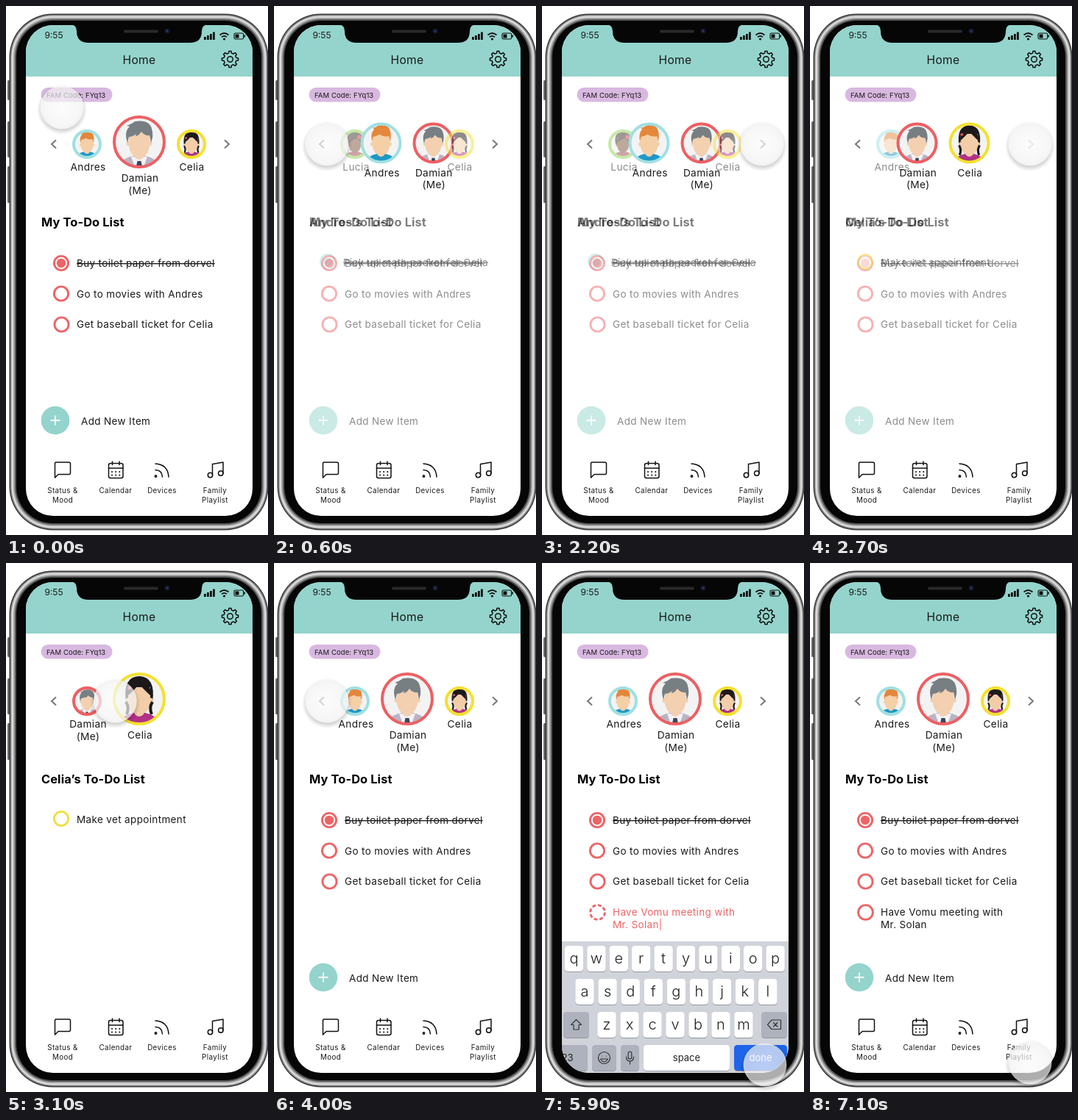
An HTML page for the animation above (7.2 s loop, 356 by 720 pixels).

```html
<!DOCTYPE html>
<html lang="en">
<head>
<meta charset="utf-8">
<title>Family to-do app</title>
<style>
html, body { margin: 0; width: 100%; height: 100%; overflow: hidden; background: #fff; }
svg { display: block; width: 100vw; height: 100vh; }
text { font-family: Inter, "Open Sans", sans-serif; fill: #1a1a1a; }
.mid { text-anchor: middle; }
.item { font-size: 13.5px; letter-spacing: .35px; }
.done { text-decoration: line-through; text-decoration-thickness: 1px; }
.name { font-size: 13.7px; letter-spacing: .35px; text-anchor: middle; }
.title { font-size: 16.4px; font-weight: 700; letter-spacing: .1px; fill: #000; }
.nav { font-size: 9.8px; letter-spacing: .4px; text-anchor: middle; }
.icon { fill: none; stroke: #111; stroke-width: 1.5; stroke-linecap: round; stroke-linejoin: round; }
.thin { stroke: #333; stroke-width: 1.2; }
.arrow { fill: none; stroke: #777; stroke-width: 2; }
.ring { fill: #fff; stroke-width: 2.9; }
</style>
</head>
<body>
<svg viewBox="0 0 356 720" xmlns="http://www.w3.org/2000/svg">
<defs>
  <clipPath id="screen"><rect x="27" y="26" width="308" height="668" rx="37"/></clipPath>
  <clipPath id="disc"><circle r="34"/></clipPath>
  <radialGradient id="tip">
    <stop offset="0" stop-color="#fbfbfb" stop-opacity=".7"/>
    <stop offset=".85" stop-color="#f3f3f3" stop-opacity=".7"/>
    <stop offset="1" stop-color="#ededed" stop-opacity=".75"/>
  </radialGradient>
  <radialGradient id="shade">
    <stop offset=".8" stop-color="#000" stop-opacity=".17"/>
    <stop offset="1" stop-color="#000" stop-opacity="0"/>
  </radialGradient>
  <mask id="outside"><rect x="-40" y="-40" width="80" height="80" fill="#fff"/><circle r="29" fill="#000"/></mask>
</defs>

<rect width="356" height="720" fill="#fff"/>
<g fill="#666">
  <rect x="2" y="101" width="4" height="27" rx="1.5"/>
  <rect x="2" y="157" width="4" height="49" rx="1.5"/>
  <rect x="2" y="218" width="4" height="50" rx="1.5"/>
  <rect x="354" y="170" width="4" height="76" rx="1.5"/>
</g>
<g id="body"></g>
<rect x="27" y="26" width="308" height="668" rx="37" fill="#fff"/>

<g clip-path="url(#screen)">
  <rect x="27" y="26" width="308" height="70" fill="#94d4cc"/>
  <text x="65" y="44" class="mid" font-size="12">9:55</text>
  <g fill="#111">
    <rect x="269" y="42" width="2.8" height="4"/><rect x="273" y="40" width="2.8" height="6"/>
    <rect x="277" y="38" width="2.8" height="8"/><rect x="281" y="35.5" width="2.8" height="10.5"/>
    <circle cx="296.5" cy="45" r="1.6"/>
    <rect x="311.5" y="38.5" width="5" height="5"/><rect x="323.4" y="39.3" width="1.5" height="3.4"/>
  </g>
  <path d="M290.5 39.5q6-5 12 0M293 42.3q3.5-2.8 7 0" fill="none" stroke="#111" stroke-width="1.8"/>
  <rect x="310" y="37" width="12.6" height="8" rx="1.8" fill="none" stroke="#111" stroke-width="1.1"/>
  <text x="181" y="79" class="mid" font-size="15.6" letter-spacing=".3">Home</text>
  <g class="icon" transform="translate(304.5 72.5)"><path id="gear"/><circle r="3.8"/></g>

  <rect x="47.5" y="111" width="97" height="19.5" rx="9.7" fill="#d8b8e0"/>
  <text x="55" y="124.5" font-size="9.5" letter-spacing=".1">FAM Code: FYq13</text>
  <path class="arrow" d="M68 182.5l-6 5.5 6 5.5"/>
  <path class="arrow" id="next" d="M297 182.5l6 5.5-6 5.5"/>
  <g id="people"></g>

  <g id="lists">
    <g></g>
    <g>
      <text class="title" x="48" y="300">Andres’s To-Do List</text>
      <circle class="ring" cx="73" cy="348" r="9.6" stroke="#a0e0e2"/><circle cx="73" cy="348" r="6.3" fill="#a0e0e2"/>
      <text class="item done" x="94" y="353.5">Pick up math packet for Celia</text>
    </g>
    <g>
      <text class="title" x="48" y="300">My To-Do List</text>
      <g stroke="#ed6467">
        <circle class="ring" cx="75" cy="350" r="9.6"/><circle class="ring" cx="75" cy="391.5" r="9.6"/>
        <circle class="ring" cx="75.5" cy="433.5" r="9.6"/>
      </g>
      <circle cx="75" cy="350" r="6.2" fill="#ed6467"/>
      <text class="item done" x="96" y="355">Buy toilet paper from dorvel</text>
      <text class="item" x="96" y="396.5">Go to movies with Andres</text>
      <text class="item" x="96" y="438">Get baseball ticket for Celia</text>
      <g id="fresh">
        <circle class="ring" cx="75.5" cy="475.5" r="9.9" stroke="#ed6467"/>
        <text class="item" x="96" y="480"></text>
        <text class="item" x="96" y="496.5"></text>
      </g>
      <circle cx="67" cy="564" r="19.3" fill="#94d4cc"/>
      <path d="M60.5 564h13M67 557.5v13" stroke="#fff" stroke-width="1.8"/>
      <text class="item" x="102" y="570">Add New Item</text>
    </g>
    <g>
      <text class="title" x="48" y="300">Celia’s To-Do List</text>
      <circle class="ring" cx="75" cy="348" r="9.6" stroke="#f0df45"/>
      <text class="item" x="96" y="353.5">Make vet appointment</text>
    </g>
  </g>

  <g class="icon">
    <path d="M68 621h17.5q2 0 2 2v12.5q0 2-2 2H71l-4.5 4.5V623q0-2 1.5-2z"/>
    <rect x="139.5" y="622.5" width="19.5" height="20" rx="2.5"/>
    <path d="M139.5 629h19.5M144.5 620v4.5M154 620v4.5"/>
    <path d="M144 634h.1m5 0h.1m5 0h.1M144 638.5h.1m5 0h.1m5 0h.1" stroke-width="2"/>
    <path d="M203 631.5q9 0 9.5 9.5M203 623q17 1 18 18"/><circle cx="203.5" cy="640" r="1.2"/>
    <path d="M280.5 638.5V623.5l14.5-2.5v15"/><circle cx="277.5" cy="638.5" r="3.2"/><circle cx="291.8" cy="636" r="3.2"/>
  </g>
  <text class="nav" x="77" y="663">Status &amp;</text><text class="nav" x="77" y="676">Mood</text>
  <text class="nav" x="149" y="663">Calendar</text><text class="nav" x="212" y="663">Devices</text>
  <text class="nav" x="284" y="663">Family</text><text class="nav" x="284" y="676">Playlist</text>

  <g id="board"></g>
</g>

<path d="M88 25q8 1 8 9q0 16 16 16H250q16 0 16-16q0-8 8-9z" fill="#060606"/>
<rect x="160" y="32.5" width="47" height="4" rx="2" fill="#292929"/>
<circle cx="219" cy="34" r="3.5" fill="#14182c"/><circle cx="219" cy="34" r="1.5" fill="#2b3768"/>

<g id="finger">
  <circle cy="3" r="34" fill="url(#shade)" mask="url(#outside)"/>
  <circle r="29" fill="url(#tip)" stroke="#fff" stroke-opacity=".5"/>
</g>
</svg>
<script>
const LOOP = 7200, STEP = 100;
const $ = id => document.getElementById(id);
const set = (el, attrs) => { for (const k in attrs) el.setAttribute(k, attrs[k]); };
const clamp = (v, lo = 0, hi = 1) => Math.max(lo, Math.min(hi, v));

// Eased value of a [time, value] track.
function track(keys, t) {
  const i = keys.findIndex(k => k[0] > t);
  if (i < 0) return keys[keys.length - 1][1];
  if (i === 0) return keys[0][1];
  const [t0, a] = keys[i - 1], [t1, b] = keys[i];
  const u = (t - t0) / (t1 - t0);
  return a + (b - a) * u * u * (3 - 2 * u);
}

const ACTIVE = [[0, 2], [400, 2], [800, 1], [2000, 1], [2400, 2], [2500, 2], [2900, 3], [3400, 3], [3800, 2]];
const FINGER_X = [[0, 76], [300, 72], [1200, 72], [1600, 299], [2880, 299], [3240, 72], [4150, 72], [4500, 70],
  [5450, 70], [5750, 303], [6300, 303], [6450, 299]];
const FINGER_Y = [[0, 138], [300, 188], [4150, 188], [4500, 563], [5450, 563], [5750, 683], [6300, 683], [6450, 680]];
const BOARD = [[4900, 185], [5200, 0], [6000, 0], [6300, 185]];
const NOTE = ["Have Vomu meeting with", "Mr. Solan"];

// Phone body: nested bands, [inset, colour], from the steel rim to the black bezel.
$("body").innerHTML = [[0, "#3a3a3a"], [1.5, "#8c8c8c"], [3, "#dcdcdc"], [5.5, "#a2a2a2"], [7.5, "#555"], [9.5, "#060606"]]
  .map(([d, fill]) => `<rect x="${4.5 + d}" y="${10.5 + d}" width="${352 - 2 * d}" height="${703 - 2 * d}" rx="${59 - d}" fill="${fill}"/>`)
  .join("");

const head = (skin, w) => `<path d="M-6 10h12v11q-6 6-12 0z" fill="${skin}"/>
  <circle cx="${-w}" cy="2" r="3.5" fill="${skin}"/><circle cx="${w}" cy="2" r="3.5" fill="${skin}"/>
  <path d="M${-w}-16H${w}V6Q${w - 2} 20 0 21Q${2 - w} 20 ${-w} 6z" fill="${skin}"/>`;
const shirt = color => `<path d="M-28 36Q-26 23-8 19H8Q26 23 28 36z" fill="${color}"/>`;

const people = [
  { name: "Lucia", ring: "#8fd254", art:
    `<path d="M-18 0Q-24-29 0-30Q24-29 18 0z" fill="#40352f"/>` + shirt("#a8435c") + head("#80563e", 14) +
    `<path d="M-15-2Q-15-20 2-20Q15-20 15-2Q10-12 3-14Q-6-10-15-2z" fill="#40352f"/>
     <circle cx="11" cy="-17" r="5" fill="#d5404a"/>` },
  { name: "Andres", ring: "#a0e0e2", art:
    shirt("#1f98c6") + head("#f5cfa6", 15) +
    `<path d="M-16-2Q-19-17-12-24L-15-27Q-8-27-5-31Q9-33 14-26Q19-17 16-2L14-12Q4-10-3-15Q-7-12-14-11z" fill="#e3873b"/>` },
  { name: "Damian", me: true, ring: "#ed5f63", art:
    shirt("#b9b3c2") + `<path d="M-11 20L-6 34 0 27 6 34 11 20z" fill="#f4f2f6"/>
     <path d="M-2.5 26h5l2 10h-9z" fill="#3b4560"/>` + head("#f2d0b0", 14) +
    `<path d="M-16 1Q-21-14-13-21L-17-22Q-9-25-6-28Q14-31 17-18Q20-8 16 1L14-9Q7-8 3-14Q-1-8-5-8L-4-11Q-9-7-14-7z" fill="#777f83"/>` },
  { name: "Celia", ring: "#f4e02f", art:
    `<path d="M-18 4Q-23-30 0-31Q23-30 18 4z" fill="#1d191b"/>` + shirt("#b23186") + head("#f3cda7", 15) +
    `<path d="M-16-4Q-16-25 0-26Q16-25 16-4Q9-10 0-20Q-9-10-16-4z" fill="#1d191b"/>
     <path d="M-18 4q5 8 1 17M18 4q-5 8-1 17" fill="none" stroke="#1d191b" stroke-width="4"/>
     <circle cx="-13" cy="-15" r="2.5" fill="#e0525c"/>` }
];

$("people").innerHTML = people.map(p => `<g><g clip-path="url(#disc)"><circle r="36" fill="#f3f3f3"/>${p.art}</g>
  <circle fill="none" stroke="${p.ring}" stroke-width="4"/>
  <text class="name"><tspan x="0">${p.name}</tspan>${p.me ? '<tspan x="0" dy="16.5">(Me)</tspan>' : ""}</text></g>`).join("");

// Gear outline: eight teeth.
$("gear").setAttribute("d", "M" + Array.from({ length: 32 }, (_, i) => {
  const a = (Math.floor(i / 4) + [-.29, -.17, .17, .29][i % 4]) * Math.PI / 4;
  const r = i % 4 === 0 || i % 4 === 3 ? 8.6 : 11.2;
  return `${(r * Math.sin(a)).toFixed(2)} ${(-r * Math.cos(a)).toFixed(2)}`;
}).join("L") + "Z");

function key(x, y, w, label = "", size = 20, fill = "#fff", ink = "#222") {
  return `<rect x="${x}" y="${y + 1}" width="${w}" height="35" rx="4.5" fill="#94979e"/>
    <rect x="${x}" y="${y}" width="${w}" height="35" rx="4.5" fill="${fill}"/>
    <text class="mid" x="${x + w / 2}" y="${y + 17.5 + size * .34}" font-size="${size}"
      font-weight="${size > 15 ? 300 : 400}" style="fill:${ink}">${label}</text>`;
}
const row = (letters, x, gap, y) => [...letters].map((c, i) => key(x + gap * i - 12.7, y, 25.4, c)).join("");
const GREY = "#adb2bc";
$("board").innerHTML = `<rect x="27" y="515" width="308" height="185" fill="#d0d3da"/>` +
  row("qwertyuiop", 43.5, 30.4, 521) + row("asdfghjkl", 58, 31.1, 566) + row("zxcvbnm", 88, 31, 611) +
  key(29, 611, 35, "", 13, GREY) + key(298, 611, 35, "", 13, GREY) +
  key(2, 656, 60, "123", 13, GREY) + key(68, 656, 33, "", 13, GREY) + key(107, 656, 25, "", 13, GREY) +
  key(138, 656, 117, "space", 13) + key(261, 656, 72, "done", 13, "#1f64ea", "#fff") +
  `<g class="icon thin"><path d="M46.500 621.500l7 7h-3.500v6.500h-7v-6.500h-3.500z"/>
   <path d="M312 622h12.500v12.500H312l-5.500-6.200zM314.500 625.500l5.500 5.500m0-5.500l-5.500 5.500"/>
   <circle cx="84.500" cy="673.500" r="8"/><path d="M79.500 675q5 8 10 0zM81.500 671v.1M87.500 671v.1"/>
   <rect x="117.200" y="665" width="4.600" height="10" rx="2.300"/><path d="M114.500 672q0 6 5 6t5-6M119.500 678v4"/></g>`;

function draw(t) {
  const active = track(ACTIVE, t);

  people.forEach((_, i) => {
    const el = $("people").children[i], [face, ring, label] = el.children;
    const off = i - active, p = clamp(off, -1, 1), d = Math.abs(p);
    const x = 181 + 71 * p, y = 185 + 3 * d, r = 36 - 16 * d;
    set(el, { opacity: clamp(2 - Math.abs(off)) });
    set(face, { transform: `translate(${x} ${y}) scale(${r / 36})` });
    set(ring, { cx: x, cy: y, r: r - 2 });
    set(label, { transform: `translate(${182 + 70.5 * p} ${239 - 15 * d})` });
    set($("lists").children[i], { opacity: clamp(1 - Math.abs(off)) });
  });
  set($("next"), { opacity: clamp(3 - active) });

  // New item: typed, then saved.
  const saved = t >= 6100, shown = t >= 4900;
  const total = NOTE[0].length + NOTE[1].length;
  const n = Math.round(total * clamp((t - 5150) / 550));
  const n2 = Math.max(0, n - NOTE[0].length);
  const [ring, one, two] = $("fresh").children;
  const caret = saved ? "" : "|";
  set($("fresh"), { opacity: shown ? 1 : 0 });
  set(ring, { "stroke-dasharray": saved ? "none" : "5 2.775" });
  one.textContent = NOTE[0].slice(0, n) + (n2 ? "" : caret);
  two.textContent = n2 ? NOTE[1].slice(0, n2) + caret : "";
  one.style.fill = two.style.fill = saved ? "#1a1a1a" : "#ed6467";

  set($("board"), { transform: `translate(0 ${track(BOARD, t)})` });
  set($("finger"), { transform: `translate(${track(FINGER_X, t)} ${track(FINGER_Y, t)})` });
}

const start = performance.now();
function tick() {
  const t = (performance.now() - start) % LOOP;
  draw(Math.floor(t / STEP) * STEP);
  requestAnimationFrame(tick);
}
tick();
</script>
</body>
</html>
```
